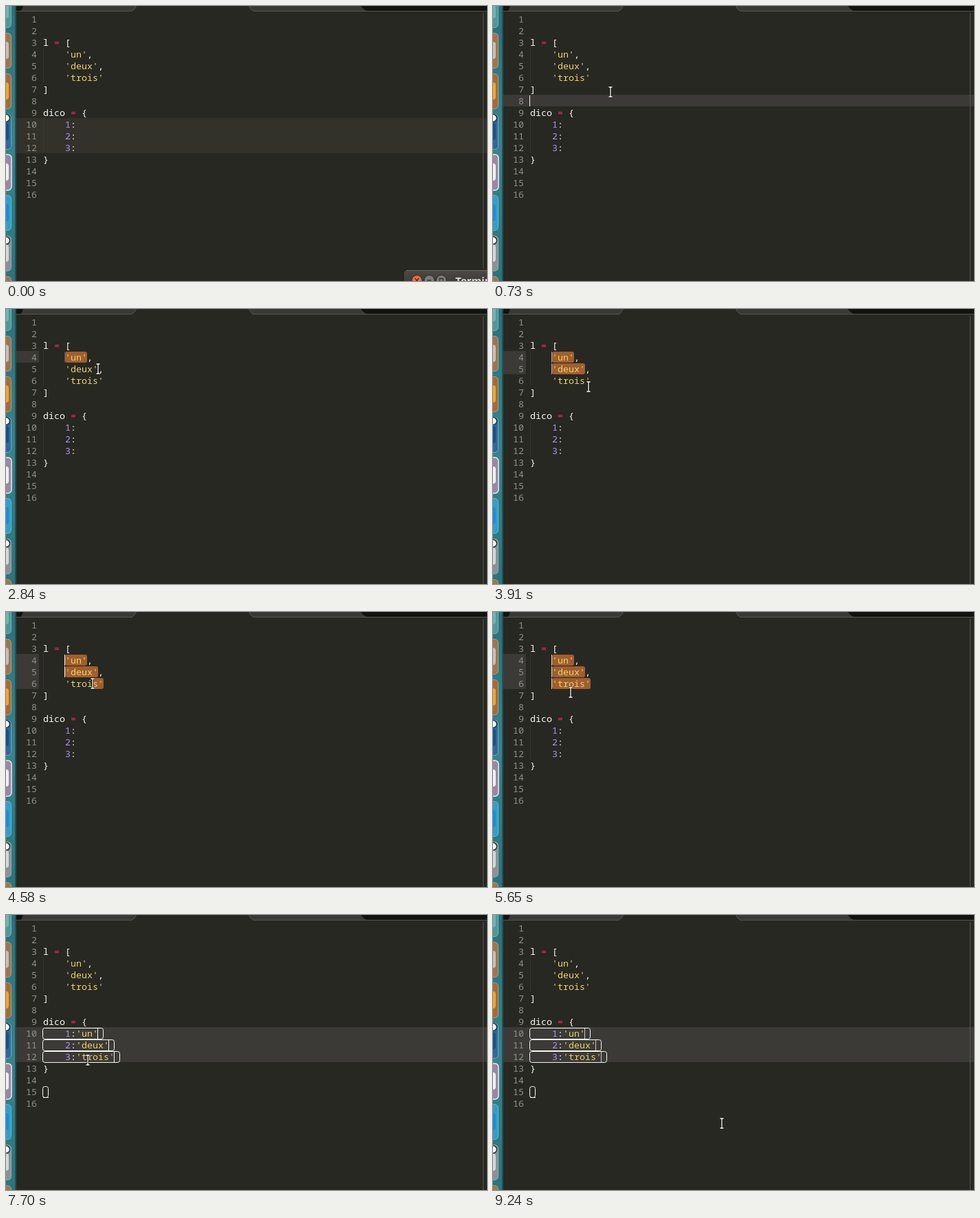
An HTML page that plays this animation: 700 px wide and 400 px high, repeating every 9320 ms.

```html
<!DOCTYPE html>
<html lang="fr">
<head>
<meta charset="utf-8">
<title>Multiple carets</title>
<style>
html, body { margin: 0; width: 100%; height: 100%; overflow: hidden; background: #272822; }
svg { display: block; width: 700px; height: 400px; }
text { font: 13.333px "Noto Sans Mono", "DejaVu Sans Mono", monospace; fill: #f8f8f2; white-space: pre; }
.no { fill: #8f908a; text-anchor: end; }
.str { fill: #ecd267; }
.op { fill: #f92672; }
.num { fill: #b190e6; }
.title { font: bold 15px "Open Sans", "Noto Sans", sans-serif; fill: #dfdbd2; }
</style>
</head>
<body>
<svg viewBox="0 0 700 400" xmlns="http://www.w3.org/2000/svg">
  <defs>
    <linearGradient id="sea" x2="0" y2="1">
      <stop offset="0" stop-color="#2c6f78"/><stop offset=".5" stop-color="#37848a"/><stop offset="1" stop-color="#2b747c"/>
    </linearGradient>
    <linearGradient id="bar" x2="0" y2="1">
      <stop offset="0" stop-color="#5a5953"/><stop offset=".15" stop-color="#4a4944"/><stop offset="1" stop-color="#3c3b37"/>
    </linearGradient>
  </defs>
  <rect width="700" height="400" fill="#272822"/>
  <g id="back"></g>
  <path d="M54.5 61V112M54.5 163V214" stroke="#42423a" stroke-dasharray="1 1"/>
  <g id="code"></g>
  <g id="pasted"></g>
  <g id="tabs">
    <rect x="15" width="685" height="8" fill="#12130f"/>
    <path d="M183 0H360V8H183Z" fill="#272822"/>
    <path d="M21 7.500Q24 5 25 -1H190Q188 5 183 7.500ZM360 7.500Q355 5 353 -1H516Q519 5 526 7.500Z" fill="#393a36"/>
    <path d="M15 7.500H183Q188 5 190 -1M353 -1Q355 5 360 7.500H700" fill="none" stroke="#55564f"/>
    <path d="M694.500 10V400" stroke="#55564f"/>
  </g>
  <g id="dock"></g>
  <g id="term">
    <path d="M578.500 401V390Q578.500 383.500 585 383.500H701V401Z" fill="url(#bar)" stroke="#1d1d1a"/>
    <path d="M583 384.500H700" stroke="#6a6962"/>
    <g stroke="#2b2a27">
      <circle cx="598" cy="399" r="7.500" fill="#ee6b3b"/>
      <circle cx="616" cy="399" r="7.500" fill="#7b7a74"/>
      <circle cx="633.500" cy="399" r="7.500" fill="#7b7a74"/>
    </g>
    <path d="M595 396l6 6m0 -6l-6 6M613 399h6M631 396.500h5v5h-5z" fill="none" stroke="#34332f" stroke-width="1.300"/>
    <text class="title" x="654" y="405">Terminal</text>
  </g>
  <g id="front"></g>
  <g id="mouse" fill="none">
    <path d="M-2.500 -7H2.500M0 -7V7M-2.500 7H2.500" stroke="#10110e" stroke-width="3"/>
    <path d="M-2.500 -7H2.500M0 -7V7M-2.500 7H2.500" stroke="#fff" stroke-width="1.300"/>
  </g>
</svg>
<script>
const LOOP = 9320, LEFT = 54, COL = 8, ROW = 17;
const HOT = '#3b3a36', DIM = '#32322b';
const FOCUS = 550, CLICK = 6200, SECOND = 6930, THIRD = 7210, PASTE = 7450;
const words = ["'un'", "'deux'", "'trois'"];
const source = ['', '', 'l = [', "    'un',", "    'deux',", "    'trois'", ']', '',
  'dico = {', '    1:', '    2:', '    3:', '}', '', '', ''];

// Each word is selected by dragging from its end back to column 4.
const drags = [1460, 3100, 4400].map((press, i) =>
  ({ press, line: 4 + i, end: 4 + words[i].length }));
const presses = [FOCUS, ...drags.map(d => d.press), CLICK, SECOND, THIRD, PASTE];
const fades = [1010, 1630, 3840, 5620, 6800, 8140];

// Mouse moves: [start, end, x, y]
const moves = [
  [150, 520, 180, 138], [650, 970, 125, 58], [1010, 1300, 121, 70], [1460, 1780, 88, 70],
  [2240, 2840, 134, 87], [3100, 3500, 88, 87], [3790, 3910, 139, 113], [3910, 4250, 142, 104],
  [4400, 4900, 90, 104], [5490, 5650, 113, 117], [5650, 6150, 106, 172],
  [6440, 6750, 120, 190], [6750, 7000, 106, 206], [7600, 8300, 333, 303]
];

const el = id => document.getElementById(id);
const clamp = (v, lo, hi) => Math.max(lo, Math.min(hi, v));
const rowY = line => 10 + ROW * (line - 1);
const colX = col => LEFT + COL * col;

const label = (line, col, s) => {
  const cls = s[0] === "'" ? 'str' : s === '=' ? 'op' : /\d/.test(s) ? 'num' : '';
  return `<text class="${cls}" x="${colX(col)}" y="${rowY(line) + 14}">${s}</text>`;
};
const box = (x, y, w, h, fill, more = '') =>
  `<rect x="${x}" y="${y}" width="${w}" height="${h}" fill="${fill}" ${more}/>`;
const band = (line, fill = HOT) => box(15, rowY(line), 685, ROW, fill);
const under = (line, col) => box(colX(col), rowY(line) + ROW, COL, 1, '#f8f8f2');
const ring = (line, cols) =>
  box(LEFT - .5, rowY(line) + 1.5, cols * COL, 16, 'none', 'rx="3" stroke="#f8f8f2"');

function buildStatic() {
  el('code').innerHTML = source.map((s, i) => {
    const n = i + 1;
    const tokens = [...s.matchAll(/'\w+'|\w+|[^\s\w]/g)];
    return `<text class="no" x="45" y="${rowY(n) + 14}">${n}</text>` +
      tokens.map(m => label(n, m.index, m[0])).join('');
  }).join('');

  el('pasted').innerHTML = words.map((w, i) =>
    label(10 + i, 6, w) + ring(10 + i, w.length + 7) + under(10 + i, 5)
  ).join('') + ring(15, 1) + under(15, 0);

  const tiles = ['#4d999b', '#a5734a', '#a96a35', '#2f689f', '#9d86a5', '#2f9fd0', '#8b9196', '#a5734a'];
  const marks = ['#72b3b0', '#c5c0b5', '#f3a52c', '#174f87', '#f0eef5', '#168fda', '#d5d7d8', '#b98b5e'];
  let dock = box(0, 0, 15, 400, 'url(#sea)') + box(13, 0, 2, 400, '#205159');
  tiles.forEach((fill, i) => {
    const y = 59 * i - 20;
    dock += box(-44, y + .5, 51.5, 51, fill, 'rx="5" stroke="#a9c0c1" stroke-opacity=".65"') +
      box(-20, y + 13, 24, 25, marks[i], 'rx="4"');
  });
  for (const y of [163, 341])
    dock += `<circle cx="0" cy="${y}" r="5.500" fill="#f5f5f5" stroke="#26383c" stroke-width="1.500"/>`;
  el('dock').innerHTML = dock + box(-44, 216, 52, 52, 'none', 'rx="5" stroke="#ece4f0" stroke-width="1.500"');
}

function mouseAt(t) {
  let x = 560, y = 370;
  for (const [from, to, nx, ny] of moves) {
    const u = clamp((t - from) / (to - from), 0, 1), e = u * u * (3 - 2 * u);
    x += (nx - x) * e;
    y += (ny - y) * e;
  }
  return [Math.round(x), Math.round(y)];
}

// Solid after a press, then a soft blink: out, off, in, on.
function caretAlpha(t) {
  const press = presses.filter(p => p <= t).pop();
  const fade = fades.find(f => f > press);
  if (t < fade) return 1;
  const p = (t - fade) % 1050;
  return p < 200 ? 1 - p / 200 : clamp((p - 620) / 200, 0, 1);
}

function draw(t) {
  const [mx, my] = mouseAt(t);
  const carets = [];
  let back = '', front = '';

  if (t < FOCUS) {
    for (const n of [10, 11, 12]) back += band(n, DIM);
  } else if (t < drags[0].press) {
    back += band(8);
    carets.push([8, 0]);
  } else if (t < CLICK) {
    for (const { line, end, press } of drags) {
      if (t < press) continue;
      const col = t < press + 500 ? clamp(Math.round((mx - LEFT) / COL), 4, end) : 4;
      if (col === end) {
        back += band(line);
        if (line === 4) front += under(3, 4) + under(7, 0);
      } else {
        back += box(15, rowY(line), 33, ROW, HOT) +
          box(colX(col), rowY(line) + 1, (end - col) * COL, 16, '#a05f2f', 'rx="3"');
      }
      carets.push([line, col]);
    }
  } else {
    const count = t < SECOND ? 1 : t < THIRD ? 2 : 3;
    for (let i = 0; i < count; i++) {
      back += band(10 + i);
      carets.push([10 + i, 6 + (t < PASTE ? 0 : words[i].length)]);
    }
    if (count === 1) front += under(9, 7) + under(13, 0);
  }

  const alpha = carets.length ? caretAlpha(t) : 0;
  for (const [line, col] of carets)
    front += box(colX(col) - 1, rowY(line) + 1, 1, 16, '#f8f8f0', `opacity="${alpha}"`);

  el('back').innerHTML = back;
  el('front').innerHTML = front;
  el('pasted').setAttribute('visibility', t < PASTE ? 'hidden' : 'visible');
  el('term').setAttribute('opacity', clamp(1 - (t - 50) / 150, 0, 1));
  el('mouse').setAttribute('visibility', t < 150 ? 'hidden' : 'visible');
  el('mouse').setAttribute('transform', `translate(${mx} ${my})`);
}

buildStatic();
const begin = performance.now();
function tick() {
  draw((performance.now() - begin) % LOOP);
  requestAnimationFrame(tick);
}
tick();
</script>
</body>
</html>
```
